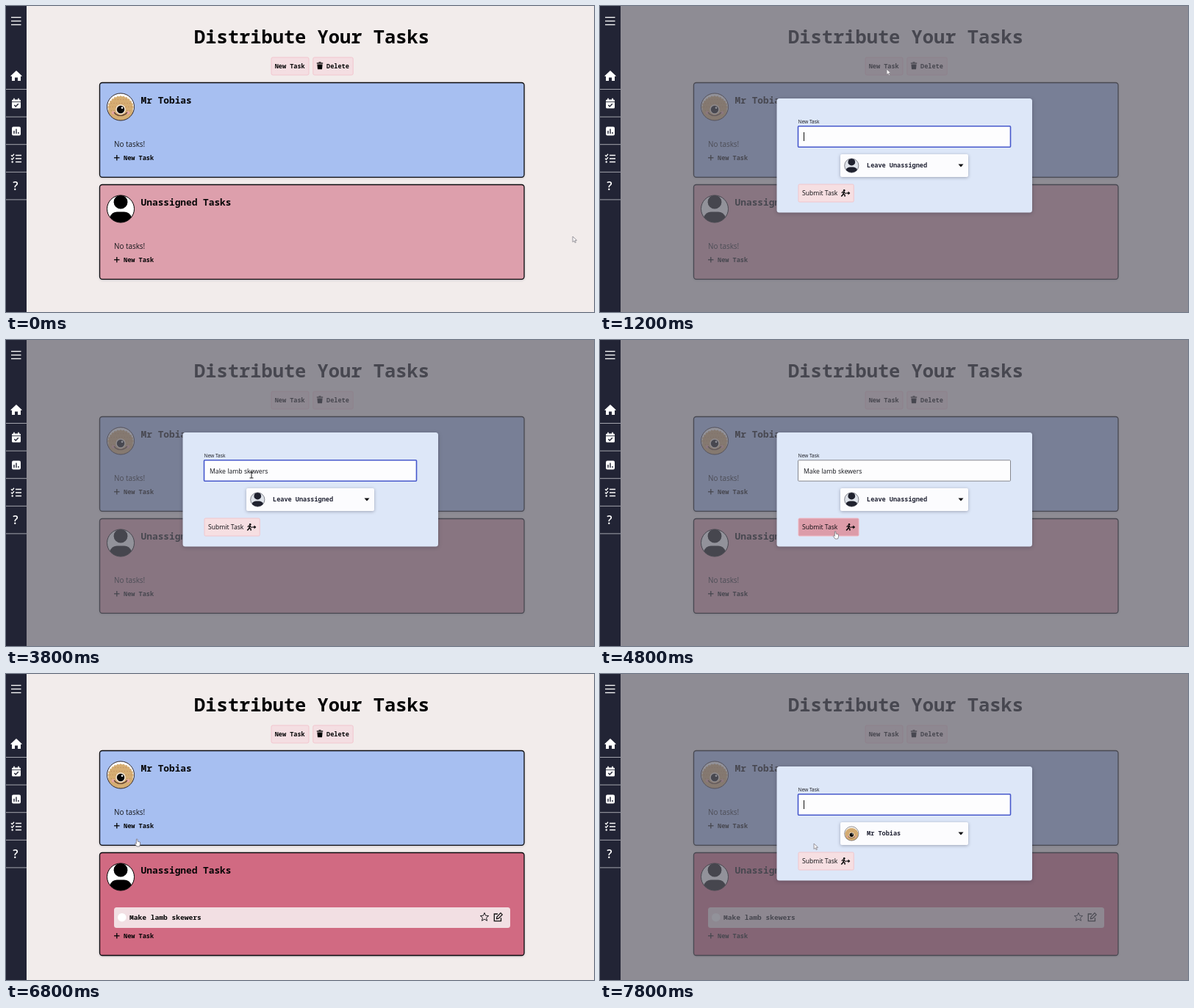
Recreate the animation shown at these times as an HTML page with a canvas. Size 800 by 417 pixels, loop 8000 ms.

```html
<!DOCTYPE html>
<html lang="en">
<head>
<meta charset="utf-8">
<title>Distribute Your Tasks</title>
<style>
  html, body { margin: 0; width: 100%; height: 100%; overflow: hidden; background: #f2eceb; }
  canvas { display: block; width: 100vw; height: 100vh; }
</style>
</head>
<body>
<canvas id="stage" width="800" height="417"></canvas>
<script>
const ctx = document.getElementById('stage').getContext('2d');
const LOOP = 8000, STEP = 200;
const MONO = '"Noto Sans Mono", monospace';
const SANS = '"Open Sans", sans-serif';
const INK = '#050506', NAVY = '#222435';
const OWNER = 'Mr Tobias', TASK = 'Make lamb skewers';

// Pointer path: time, x, y, shape used from then on
const PATH = [
  [0, 771, 314, 'arrow'], [200, 768, 312, 'arrow'], [400, 640, 232, 'hand'],
  [600, 455, 122, 'hand'], [800, 399, 89, 'arrow'], [1000, 390, 84, 'hand'],
  [1200, 390, 86, 'arrow'], [1400, 385, 96, 'arrow'], [2000, 340, 172, 'text'],
  [2400, 334, 184, 'text'], [3800, 334, 184, 'text'], [4200, 327, 222, 'hand'],
  [4400, 322, 258, 'hand'], [4800, 318, 261, 'hand'], [5200, 329, 255, 'hand'],
  [5600, 327, 254, 'hand'], [6800, 176, 225, 'hand'], [7000, 174, 207, 'hand'],
  [7200, 174, 207, 'arrow'], [7800, 291, 231, 'arrow'], [8000, 291, 231, 'arrow']
];

const clamp = v => Math.max(0, Math.min(1, v));
const ramp = (t, start, length) => clamp((t - start) / length);

function text(str, x, y, size, font = MONO, weight = 'bold', color = INK) {
  ctx.font = `${weight} ${size}px ${font}`;
  ctx.fillStyle = color;
  ctx.fillText(str, x, y);
}

function box(x, y, w, h, r, fill, stroke, width = 1) {
  ctx.beginPath();
  ctx.roundRect(x, y, w, h, r);
  if (fill) { ctx.fillStyle = fill; ctx.fill(); }
  if (stroke) { ctx.strokeStyle = stroke; ctx.lineWidth = width; ctx.stroke(); }
}

function disc(x, y, r, fill, stroke, width = 1) {
  ctx.beginPath();
  ctx.arc(x, y, r, 0, Math.PI * 2);
  if (fill) { ctx.fillStyle = fill; ctx.fill(); }
  if (stroke) { ctx.strokeStyle = stroke; ctx.lineWidth = width; ctx.stroke(); }
}

function trace(points, close) {
  ctx.beginPath();
  for (let i = 0; i < points.length; i += 2) ctx.lineTo(points[i], points[i + 1]);
  if (close) ctx.closePath();
}

function line(points, color, width = 1) {
  trace(points);
  ctx.strokeStyle = color;
  ctx.lineWidth = width;
  ctx.stroke();
}

function poly(points, fill, stroke, width = 1) {
  trace(points, true);
  if (fill) { ctx.fillStyle = fill; ctx.fill(); }
  if (stroke) { ctx.strokeStyle = stroke; ctx.lineWidth = width; ctx.stroke(); }
}

function at(x, y, scale, draw) {
  ctx.save();
  ctx.translate(x, y);
  ctx.scale(scale, scale);
  draw();
  ctx.restore();
}

function shadowed(blur, draw) {
  ctx.save();
  ctx.shadowColor = 'rgba(40,40,60,.35)';
  ctx.shadowBlur = blur;
  ctx.shadowOffsetY = 1;
  draw();
  ctx.restore();
}

function person(color, back) {
  disc(0, 0, 18.5, back);
  ctx.save();
  ctx.clip();
  disc(0, -9.3, 9.4, color);
  box(-15.5, 4, 31, 24, 11, color);
  ctx.restore();
  disc(0, 0, 18.5, null, color, 1);
}

function creature() {
  disc(0, 0, 18.5, '#fff');
  ctx.save();
  ctx.clip();
  const outline = [];
  for (let i = 0; i <= 26; i++) {
    const a = Math.PI * (1 + i / 26), r = i % 2 ? 17.5 : 16;
    outline.push(Math.cos(a) * r * 1.04, 2 + Math.sin(a) * r);
  }
  poly([...outline, 17, 22, -17, 22], '#d5ad72');
  for (let row = 0; row < 5; row++)
    for (let i = -4; i <= 4; i++) {
      const x = i * 3.6 + (row % 2) * 1.8, y = -10 + row * 5;
      if (Math.hypot(x, y - 2) < 15) disc(x, y, 0.7, '#c28f61');
    }
  disc(-10, 8, 2.3, '#e7a6a0');
  disc(10, 8, 2.3, '#e7a6a0');
  ctx.beginPath();
  ctx.arc(0, 1, 11, Math.PI * 0.2, Math.PI * 0.8);
  ctx.strokeStyle = '#55382c';
  ctx.lineWidth = 1.2;
  ctx.stroke();
  disc(0, 3.5, 6.7, '#f4e6d5');
  disc(0, 3.5, 5.2, '#070707');
  disc(2, 1.2, 1.3, '#fff');
  ctx.restore();
  disc(0, 0, 18.5, null, '#30272a', 1);
}

function sidebar() {
  ctx.fillStyle = NAVY;
  ctx.fillRect(0, 0, 28, 417);
  for (const y of [15.5, 20.5, 25.5]) line([7, y, 20.5, y], '#fff', 1.3);
  for (let i = 0; i < 5; i++) {
    const y = 113.5 + i * 37.6;
    line([0, y, 28, y], '#a4a5ad', 1);
  }
  // home
  poly([14, 88, 22, 95.5, 20, 96, 20, 102, 16, 102, 16, 97.5, 12, 97.5, 12, 102, 8, 102, 8, 96, 6, 95.5], '#fff');
  // calendar
  box(8, 127.5, 12, 12, 1.5, '#fff');
  line([11, 125.7, 11, 129], '#fff', 1.6);
  line([17, 125.7, 17, 129], '#fff', 1.6);
  line([8, 130.7, 20, 130.7], NAVY, 0.9);
  line([11.3, 135, 13.2, 137, 16.8, 133.2], NAVY, 1.4);
  // chart
  box(8, 164.5, 12, 12, 2, '#fff');
  line([11, 170, 11, 174], NAVY, 1.4);
  line([14, 167.5, 14, 174], NAVY, 1.4);
  line([17, 172, 17, 174], NAVY, 1.4);
  // checklist
  for (const y of [203.5, 208, 212.5]) line([13, y, 21, y], '#fff', 1.5);
  line([7, 203.3, 8.4, 204.7, 11, 201.8], '#fff', 1.3);
  line([7, 207.8, 8.4, 209.2, 11, 206.3], '#fff', 1.3);
  disc(8.7, 212.5, 1.2, '#fff');
  text('?', 9.2, 251.2, 16, SANS, '600', '#fff');
}

function plusLink(y) {
  line([147, y, 154.5, y], INK, 1.3);
  line([150.8, y - 3.8, 150.8, y + 3.8], INK, 1.3);
  text('New Task', 160, y + 3.2, 8.55);
}

function card(y, h, fill, title, avatar) {
  shadowed(3, () => box(127.5, y + 0.5, 577.5, h, 3.5, fill));
  box(127.5, y + 0.5, 577.5, h, 3.5, null, '#0b0b0e', 1.3);
  at(156, y + 33.5, 1, avatar);
  text(title, 183.6, y + 28.7, 12.8);
}

function taskRow() {
  box(147, 318, 539, 28, 3.5, '#f2dfe3');
  disc(157.8, 331.7, 5.8, '#fff');
  text(TASK, 168, 335, 9.58);
  const star = [];
  for (let i = 0; i < 10; i++) {
    const a = -Math.PI / 2 + i * Math.PI / 5, r = i % 2 ? 2.7 : 6;
    star.push(651 + Math.cos(a) * r, 331.4 + Math.sin(a) * r);
  }
  poly(star, null, '#1c1c20', 1);
  line([669, 327, 664.3, 327, 664.3, 336.7, 673.5, 336.7, 673.5, 332.3], '#111', 1.3);
  poly([667.5, 333.7, 667.9, 331, 673, 325.7, 675.2, 327.9, 670, 333.2], null, '#111', 1.2);
}

function page(hasTask, hoverNew) {
  ctx.fillStyle = '#f2eceb';
  ctx.fillRect(0, 0, 800, 417);
  text('Distribute Your Tasks', 256, 51, 25.4);
  box(361, 70, 51, 24, 2, hoverNew ? '#dea0ad' : '#f4dee2', '#f2c6cf');
  text('New Task', 365.7, 85.2, 8.55);
  box(417.8, 70, 54.4, 24, 2, '#f4dee2', '#f2c6cf');
  poly([423.4, 79.5, 430.6, 79.5, 430, 86.2, 424, 86.2], INK);
  line([422.8, 78, 431.2, 78], INK, 1.3);
  line([425.5, 76.8, 428.5, 76.8], INK, 1.1);
  text('Delete', 436, 85.2, 8.55);

  card(104, 128.8, '#a7bff1', OWNER, creature);
  text('No tasks!', 147, 191.6, 9.9, SANS, 'normal', '#17181c');
  plusLink(206.8);

  card(243, hasTask ? 140 : 128.8, hasTask ? '#d16a82' : '#dd9fac', 'Unassigned Tasks', () => person('#000', '#fff'));
  if (hasTask) taskRow();
  else text('No tasks!', 147, 330.6, 9.9, SANS, 'normal', '#17181c');
  plusLink(hasTask ? 356.8 : 345.8);
}

function walker(x, y) {
  at(x, y, 1, () => {
    disc(4.2, -3.8, 1.3, INK);
    line([0.8, 0, 2, -1.8, 4.2, -2, 5.2, 0, 6.8, 0.4], INK, 1.1);
    line([3.8, -1.8, 3, 1.4, 0.3, 4.6], INK, 1.6);
    line([3, 1.2, 5, 2.4, 5.2, 4.8], INK, 1.4);
    line([7.2, 0, 11, 0], INK, 1.3);
    poly([9.6, -2.6, 12.4, 0, 9.6, 2.6], INK);
  });
}

function modal({ typed, focused, caret, hover, forOwner }) {
  shadowed(5, () => box(240.5, 126, 347.5, 155.5, 3.5, '#dde7f8'));
  text('New Task', 269.4, 160, 6.65, SANS, 'normal', '#15161c');
  box(269.5, 163.8, 289, 28.4, 1, '#fdfdfe', focused ? '#4658cc' : '#85878e', focused ? 1.6 : 1);
  text(typed, 277, 181.6, 8.7, SANS, 'normal', '#15161c');
  if (caret) {
    const x = Math.round(277 + ctx.measureText(typed).width) + 0.5;
    line([x, 172, x, 184], '#111', 1);
  }

  shadowed(4, () => box(327, 202, 174, 31, 2, '#fcfcfe'));
  at(342.3, 217.5, 0.52, forOwner ? creature : () => person('#20222f', '#dfe3ea'));
  text(forOwner ? OWNER : 'Leave Unassigned', 363, 220.3, 8.55, MONO, 'bold', NAVY);
  poly([487.5, 215.5, 494.5, 215.5, 491, 219.5], '#0c0c10');

  const grow = hover ? 6.8 : 0;
  box(270, 243, 75.2 + grow, 24, 1.5, hover ? '#dc9ca9' : '#f6dfe2', hover ? '#f0b5c0' : '#f1c5cc');
  text('Submit Task', 275, 258.4, 8.63, SANS, 'normal', '#0c0c10');
  walker(328 + grow, 255);
}

function pointer(t) {
  let i = 0;
  while (i < PATH.length - 2 && PATH[i + 1][0] <= t) i++;
  const [t0, x0, y0, shape] = PATH[i], [t1, x1, y1] = PATH[i + 1];
  const k = ramp(t, t0, t1 - t0);
  at(x0 + (x1 - x0) * k, y0 + (y1 - y0) * k, 1, () => {
    if (shape === 'text') {
      line([-2.5, -4, 2.5, -4], '#222', 1);
      line([0, -4, 0, 4], '#222', 1);
      line([-2.5, 4, 2.5, 4], '#222', 1);
    } else if (shape === 'hand') {
      poly([1.4, 0, 2.8, 0, 3.2, 3.2, 6.4, 4, 6.6, 7, 5.5, 10, 2, 10, -0.8, 6.3, 0.2, 5.5, 1.3, 6.5], '#fff', '#77727a', 0.8);
    } else {
      poly([0, 0, 0, 7.6, 1.9, 6, 3.2, 8.7, 4.4, 8.1, 3.2, 5.5, 5.6, 5.3], '#f7f4f5', '#85828a', 0.8);
    }
  });
}

function draw(t) {
  const second = t >= 7000;
  const shown = second ? ramp(t, 7100, 200) : Math.min(ramp(t, 1000, 200), 1 - ramp(t, 4900, 200));
  page(t >= 5000, t === 1000);
  if (shown > 0) {
    ctx.globalAlpha = shown;
    ctx.fillStyle = 'rgba(100,100,111,.7)';
    ctx.fillRect(28, 0, 772, 417);
    const count = second || t < 2400 ? 0 : Math.floor(1 + (t - 2400) / STEP * 2.3);
    const typing = count > 0 && count < TASK.length;
    const focused = second || t < 4800;
    const blinkOn = (t - (second ? 7400 : 1200) + 1000) % 1000 < 500;
    modal({
      typed: TASK.slice(0, count),
      focused,
      caret: focused && (typing || blinkOn),
      hover: !second && t >= 4400,
      forOwner: second
    });
    ctx.globalAlpha = 1;
  }
  sidebar();
  pointer(t);
}

const start = performance.now();
function tick(now) {
  const t = Math.max(0, now - start) % LOOP;
  draw(Math.floor(t / STEP) * STEP);
  requestAnimationFrame(tick);
}
draw(0);
requestAnimationFrame(tick);
</script>
</body>
</html>
```
